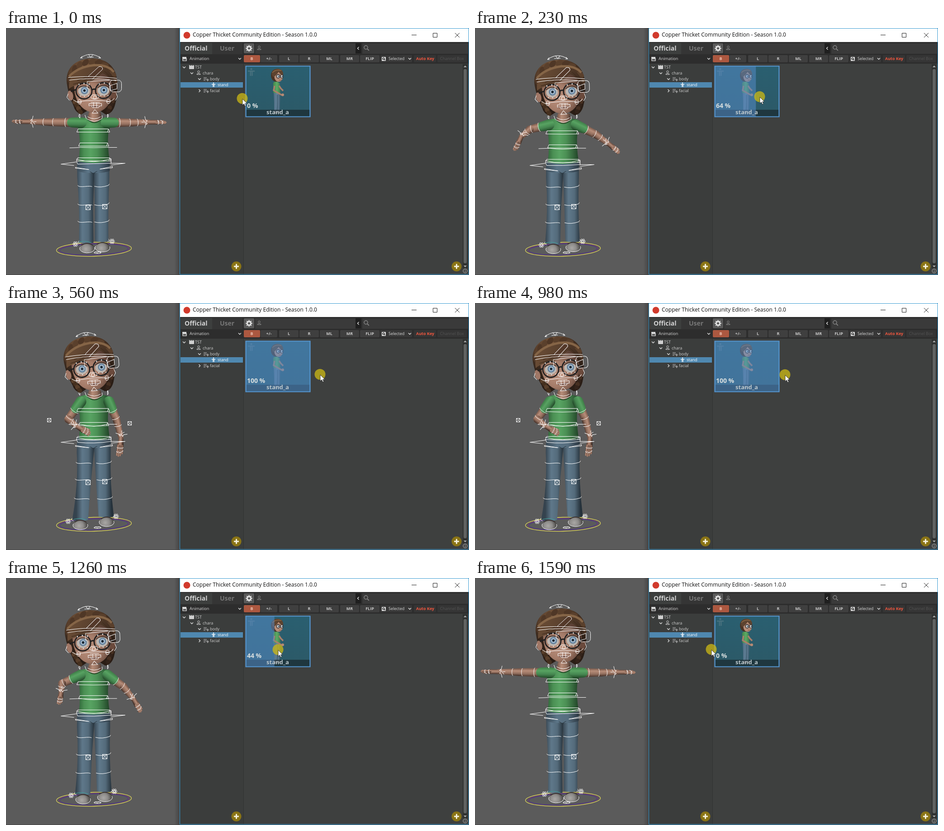
An HTML page with a canvas for the animation above (1.77 s loop, 1024 by 547 pixels).

```html
<!DOCTYPE html>
<html lang="en">
<head>
<meta charset="utf-8">
<title>Pose library</title>
<style>
html, body { margin: 0; width: 100%; height: 100%; overflow: hidden; background: #5b5b5b; }
canvas { display: block; width: 100vw; height: 100vh; }
</style>
</head>
<body>
<canvas id="stage" width="1024" height="547"></canvas>
<script>
const c = document.getElementById('stage').getContext('2d');
const LOOP = 1770;
const TICKS = [0, 50, 90, 140, 190, 230, 280, 320, 370, 410, 460, 510, 560, 980, 1020, 1070,
  1120, 1160, 1210, 1250, 1300, 1350, 1390, 1440, 1490, 1540, 1590];

// Keys are [position, value] pairs; values may be numbers or points.
const POINTER_X = [[0, 522], [50, 529], [230, 629], [410, 673], [560, 694], [979, 694], [980, 685],
  [1160, 628], [1390, 559], [1490, 539], [1540, 528], [1590, 522]];
const POINTER_Y = [[0, 156], [230, 152], [410, 155], [560, 158], [1160, 159], [1390, 158]];
const PERCENT = [[0, 0], [50, 0], [230, 64], [410, 82], [560, 100], [980, 100], [1160, 64], [1390, 14], [1490, 0]];
const POSE = [[0, 0], [40, 0], [230, .42], [410, .8], [560, 1], [980, 1], [1160, .84],
  [1390, .2], [1490, .04], [1540, .01], [1590, 0]];

const STOPS = [0, .2, .42, .81, 1];
const joint = (...pts) => pts.map((p, i) => [STOPS[i], p]);
const ARM_L = [
  joint([166, 209], [164, 212], [163, 214], [165, 216], [165, 218]),
  joint([98, 208], [112, 219], [121, 224], [127, 245], [137, 257]),
  joint([50, 207], [80, 227], [102, 240], [147, 269], [157, 273]),
  joint([12, 207], [48, 247], [87, 272], [157, 291], [187, 289])
];
const ARM_R = [
  joint([221, 209], [222, 211], [223, 214], [226, 216], [227, 218]),
  joint([278, 209], [272, 224], [268, 236], [250, 248], [244, 258]),
  joint([316, 208], [302, 233], [295, 256], [265, 285], [254, 299]),
  joint([355, 208], [339, 247], [320, 276], [272, 323], [250, 340])
];

const SKIN = ['#6d4f42', '#b78d79', '#94705f', '#3f2d26'];
const GREEN = ['#3c7a45', '#58a362', '#458650', '#224828'];
const JEANS = ['#35434e', '#5f788a', '#546b7b', '#25313a'];

const mix = (a, b, k) => a + (b - a) * k;
function track(keys, x) {
  let i = 0;
  while (i < keys.length - 1 && keys[i + 1][0] <= x) i++;
  const [x0, a] = keys[i], [x1, b] = keys[Math.min(i + 1, keys.length - 1)];
  const k = x1 > x0 ? Math.max(0, (x - x0) / (x1 - x0)) : 0;
  return Array.isArray(a) ? a.map((v, n) => mix(v, b[n], k)) : mix(a, b, k);
}

function rect(col, x, y, w, h, r = 0) {
  c.fillStyle = col;
  c.beginPath();
  c.roundRect(x, y, w, h, r);
  c.fill();
}
function fill(col, d) {
  c.fillStyle = col;
  c.fill(new Path2D(d));
}
function line(d, col = '#fff', w = 1) {
  c.strokeStyle = col;
  c.lineWidth = w;
  c.stroke(new Path2D(d));
}
function oval(col, x, y, rx, ry = rx, turn = 0) {
  c.fillStyle = col;
  c.beginPath();
  c.ellipse(x, y, rx, ry, turn, 0, 7);
  c.fill();
}
function ring(x, y, rx, ry = rx, col = '#fff', w = 1, turn = 0, from = 0, to = 2 * Math.PI) {
  c.strokeStyle = col;
  c.lineWidth = w;
  c.beginPath();
  c.ellipse(x, y, rx, ry, turn, from, to);
  c.stroke();
}
function text(s, x, y, size, col, bold, align = 'left') {
  c.font = `${bold ? 'bold ' : ''}${size}px "Open Sans", sans-serif`;
  c.textAlign = align;
  c.textBaseline = 'middle';
  c.fillStyle = col;
  c.fillText(s, x, y);
}
function blend(x0, y0, x1, y1, cols) {
  const g = c.createLinearGradient(x0, y0, x1, y1);
  cols.forEach((col, i) => g.addColorStop(i / (cols.length - 1), col));
  return g;
}
function glow(x, y, r, cols) {
  const g = c.createRadialGradient(x, y, 0, x, y, r);
  cols.forEach((col, i) => g.addColorStop(i / (cols.length - 1), col));
  return g;
}
const between = (a, b, k) => [mix(a[0], b[0], k), mix(a[1], b[1], k)];
const angle = (a, b) => Math.atan2(b[1] - a[1], b[0] - a[0]);

function limb(a, b, ra, rb, cols) {
  const t = angle(a, b), len = Math.hypot(b[0] - a[0], b[1] - a[1]);
  const lit = Math.cos(t) < .2 ? -1 : 1;
  c.save();
  c.translate(...a);
  c.rotate(t);
  c.fillStyle = blend(0, -ra * lit, 0, ra * lit, cols);
  c.beginPath();
  c.arc(0, 0, ra, Math.PI / 2, Math.PI * 1.5);
  c.lineTo(len, -rb);
  c.arc(len, 0, rb, -Math.PI / 2, Math.PI / 2);
  c.fill();
  c.restore();
}
function cuff(a, b, k, r) {
  ring(...between(a, b, k), 2.5, r, '#fff', 1, angle(a, b), -1.6, 1.6);
}
function crossBox(x, y, s) {
  line(`M${x - s} ${y - s}h${2 * s}v${2 * s}h${-2 * s}zl${2 * s} ${2 * s}M${x + s} ${y - s}l${-2 * s} ${2 * s}`);
}
function flower(x, y) {
  for (let i = 0; i < 6; i++) ring(x + 4 * Math.cos(i * 1.047), y + 4 * Math.sin(i * 1.047), 1.7);
  ring(x, y, 2);
}

function arm(joints, q) {
  const [s, e, w, tip] = joints.map(j => track(j, q));
  const turn = angle(w, tip), len = Math.hypot(tip[0] - w[0], tip[1] - w[1]);
  limb(s, e, 10.5, 8.5, SKIN);
  limb(e, w, 8.5, 5.5, SKIN);
  limb(w, between(w, tip, .45), 5, 5 + 2.5 * q, SKIN);
  for (let i = 0; i < 4; i++) {
    const off = (i - 1.5) * (1.7 + 1.9 * q), reach = len * (i === 0 ? .85 : 1 - .04 * Math.abs(i - 2));
    const at = (d, o) => [w[0] + d * Math.cos(turn) - o * Math.sin(turn), w[1] + d * Math.sin(turn) + o * Math.cos(turn)];
    const root = at(len * .42, off * .8), end = at(reach - 2, off);
    limb(root, end, 2.3 + .4 * q, 1.8 + .4 * q, SKIN);
    cuff(root, end, .15, 2.2);
    cuff(root, end, .6, 2);
  }
  limb(s, between(s, e, .3 + .08 * q), 12, 11, GREEN);
  cuff(s, e, .5, 10);
  cuff(s, e, .9, 8.5);
  cuff(e, w, .3, 8);
  // Wrist control
  c.save();
  c.translate(...between(w, tip, -.25));
  c.rotate(turn);
  line('M0 -13L2 -5L6 -3L2 0L6 3L2 5L0 13M-4 -6L4 6M-7 0H-2');
  c.restore();
}

function legs(q) {
  const m = (a, b) => mix(a, b, q);
  const shoe = (x, y) => {
    oval(glow(x - 3, y + 2, 19, ['#a9a7a5', '#8d8b89', '#454341']), x, y, 16.5, 10);
    ring(x, y + 1, 16.5, 9.5, '#fff', 1, 0, -.3, 3.5);
    line(`M${x - 13} ${y - 6}Q${x} ${y - 15} ${x + 13} ${y - 6}`, '#3c3330', 2);
  };
  const lx = m(161, 146), ly = m(474, 479), rx = m(226, 238), ry = m(471, 472);
  fill(blend(155, 0, 195, 0, JEANS),
    `M157 298L${m(157, 156)} 330Q${m(163, 160)} 400 ${lx} ${ly}Q${lx + 16} ${ly + 6} ${m(193, 181)} ${ly + 1}L${m(192, 187)} 400L195 318V298z`);
  fill(blend(193, 0, 233, 0, JEANS),
    `M194 298V320L${m(196, 199)} 400L${m(196, 204)} ${ry}Q${m(210, 221)} ${ry + 5} ${rx} ${ry}Q${m(225, 229)} 400 ${m(228, 231)} 330V298z`);
  fill(blend(156, 0, 230, 0, ['#3a4a56', '#5b7486', '#566d7e', '#2a3640']), 'M157 296H229L229 316Q211 322 195 320Q174 322 157 316z');
  line('M194 324Q194 319 201 317M193 324Q190 319 185 318', '#2c3942', 1.2);
  line(`M${m(159, 148)} ${ly}q15 -5 29 1`, '#3fa39a');
  shoe(m(179, 164), m(487, 491));
  shoe(m(213, 222), m(485, 484));
  // Leg rings
  [[350, 354], [391, 391], [429, 433]].forEach(([a, b], i) => {
    const y = m(a, b);
    line(`M${m(158, 154 - i * 2)} ${y - 2}q2 4 16 2.5t${m(16, 18)} .5`);
    line(`M${m(195, 199 + i)} ${y}q14 4 ${m(31, 32)} -2l2 -3`);
  });
  line(`M${lx} ${ly - 3}q-5 4 3 6M${rx} ${ry - 4}q5 4 -2 5`);
  crossBox(181, 397, 5);
  crossBox(218, 395, 5);
  flower(m(153, 137), m(478, 483));
  flower(m(234, 243), m(472, 472));
  ring(202, 497, 8, 2);
  line('M195 497l3 -2l3 3l4 -3l4 2');
}

function torso(q) {
  const m = (a, b) => mix(a, b, q);
  const y = m(0, 5), neck = m(186, 193), in_ = 7 * q;
  fill(blend(180, 0, 212, 0, SKIN), `M183 ${neck}H209L213 ${206 + y}Q195 ${220 + y} 178 ${206 + y}z`);
  fill(blend(158, 0, 229, 0, ['#2c5f35', '#4b9054', '#58a362', '#4c9155', '#376b3f', '#204226']),
    `M177 ${198 + y}Q166 ${199 + y} ${154 + in_} ${203 + y}L161 ${230 + y}Q165 262 ${m(160, 161)} ${295 + y}Q194 ${302 + y} 229 ${295 + y}Q223 260 226 ${230 + y}L${235 - in_} ${203 + y}Q224 ${199 + y} 213 ${198 + y}Q196 ${219 + y} 177 ${198 + y}z`);
  line(`M177 ${199 + y}Q195 ${219 + y} 213 ${199 + y}`, '#28552f', 2);
}

function torsoControls(q) {
  const m = (a, b) => mix(a, b, q);
  const y = m(0, 5), band = (x0, x1, top, h) =>
    line(`M${x0 + 3} ${top}H${x1 - 3}L${x1} ${top + h}Q${(x0 + x1) / 2} ${top + h + 2 * q} ${x0} ${top + h}zM${x1 - 3} ${top}l-2 ${h}`);
  band(156, 229, m(223, 233), 7);
  band(160, 227, m(254, 264), 7);
  band(155, 232, m(287, 295), 7);
  const mid = m(265, 269), hip = m(300, 307);
  line(`M140 ${mid}L165 ${mid - 1}Q194 ${mid + 8 * q} 222 ${mid - 1}L245 ${mid - 1}`);
  line(`M121 ${hip + 1}L156 ${hip - 4}L158 ${hip + 1}Q194 ${hip + 5 * q} 231 ${hip - 1}L263 ${hip - 1}L232 ${hip + 3}M121 ${hip + 1}L150 ${hip + 4}`);
  line(`M155 ${hip - 10}Q194 ${hip + 1} 232 ${hip - 11}V${hip}`);
  line(`M153 ${hip + 8}L183 ${hip + 13}L153 ${hip + 10}zM207 ${hip + 12}L235 ${hip + 6}V${hip + 9}z`);
  line(`M174 ${192 + y}l3 8Q194 ${212 + y} 212 ${200 + y}V${193 + y}M180 ${196 + y}Q195 ${205 + y} 209 ${196 + y}`);
  line(`M160 ${195 + y}l3 -8v12zM226 ${195 + y}l-2 -9v12z`);
}

function head(q) {
  c.save();
  c.translate(194 - 5 * q, 140 + 6 * q);
  c.rotate(-.07 * q);
  c.translate(-194, -140);
  const brown = glow(176, 84, 95, ['#7b5a3f', '#5b412d', '#33241a', '#2a1d15']);
  fill(brown, 'M134 122C130 86 156 67 190 67C226 67 247 90 245 124Q247 150 240 172Q234 190 220 191L194 174L166 191Q152 186 149 172Q138 150 134 122z');
  for (let i = 0; i < 11; i++) {
    const a = Math.PI * (1.02 + i * .096);
    oval(i % 2 ? '#5a402c' : '#4f3726', 190 + 49 * Math.cos(a), 117 + 43 * Math.sin(a), 9, 6, a + 1.1);
  }
  for (let i = 0; i < 4; i++) {
    oval(i % 2 ? '#45301f' : '#593f2b', 152 + i * 4, 164 + i * 7, 6, 5, .8);
    oval(i % 2 ? '#33231a' : '#452f21', 235 - i * 3, 162 + i * 7, 5, 5, -.8);
  }
  oval('#a07766', 142, 149, 6, 11, -.2);
  oval('#6b4a3c', 239, 149, 5, 11, .2);
  fill(glow(183, 150, 56, ['#ba907d', '#a57c69', '#5b4035']),
    'M150 128Q155 96 194 96Q233 98 236 134Q236 163 217 179Q195 195 172 179Q151 163 150 128z');
  // Bangs and headband
  fill(blend(140, 80, 240, 125, ['#6e4f37', '#5a412e', '#3a281d']),
    'M139 134Q135 93 189 82Q237 82 243 134Q235 114 214 98Q192 121 168 124Q150 125 139 134z');
  line('M139 107Q158 86 193 82Q224 80 238 97', '#856547', 5);
  line('M148 124Q180 118 205 94M157 116Q184 108 203 89M217 95Q231 106 238 124', '#3f2b1e', 1.2);
  fill('#54392a', 'M176 111L203 85Q214 84 215 92L187 117z');
  line('M181 107L205 85Q214 84 213 91L190 113');

  // Eyes
  [[172, 138], [215, 137]].forEach(([x, y]) => {
    oval('#bdb8b3', x, y + 1, 13, 11);
    oval(glow(x + 1, y, 8.5, ['#8fabc4', '#86a4c0', '#4d6b86']), x + 1, y, 8);
    oval('#1c2833', x + 1, y, 2.8);
    ring(x + 1, y, 4, 4, '#e4e8ea', .8);
    line(`M${x - 13} ${y - 5}Q${x} ${y - 15} ${x + 13} ${y - 5}`, '#41302a', 1.8);
    ring(x, y + 1, 17.5, 17.5, '#222020', 2.8);
  });
  line('M189 137Q194 133 198 136M154 136L143 140M233 135L242 139', '#222020', 3);
  oval('#c0957f', 195, 152, 6, 5);
  line('M184 172Q195 176 207 171', '#5f3a32', 2);

  // Rig controls
  line('M164 66Q186 50 209 66M164 66l4 -4M164 66h5M209 66l-4 -4M209 66h-5M182 58l5 7l5 -7M179 64h14');
  line('M137 109Q190 104 245 111M139 115Q190 108 243 116');
  line('M179 118L229 115M179 118V134');
  c.beginPath();
  c.roundRect(229, 115, 26, 26, 7);
  c.stroke();
  line('M230 127L245 122V134L231 138z');
  line('M157 163Q194 157 229 162M148 158Q157 166 166 164M222 163Q234 163 239 155');
  ring(162, 163, 4, 5);
  ring(226, 162, 4, 5);
  ring(196, 152, 9, 5);
  ring(196, 153, 3.5);
  line('M183 167H211V172H183zM187 164H207M188 172l3 4h13l3 -4M193 165v10M200 165v10');
  line('M196 180l-6 8h13zM137 145l-3 8l6 7M243 143l3 9l-5 8');
  for (let i = 0; i < 3; i++) {
    rect('#eee', 160 + i * 11, 123 - 2 * (i % 2), 2, 3);
    rect('#eee', 205 + i * 11, 122 - 2 * (i % 2), 2, 3);
    rect('#eee', 163 + i * 9, 149 + i % 2, 2, 2);
    rect('#eee', 208 + i * 8, 148 + i % 2, 2, 2);
  }
  c.restore();
}

function character(q) {
  c.save();
  c.translate(.5, .5);
  ring(194, 489.5, 83, 15.5, '#e0d65a', 1.3, -.03);
  ring(194, 489.5, 77, 12.5, '#742f75', 1.4, -.03);
  ring(194, 490, 75, 12, '#29419a', .7, -.03);
  legs(q);
  torso(q);
  arm(ARM_L, q);
  arm(ARM_R, q);
  torsoControls(q);
  head(q);
  if (q > .6) {
    crossBox(mix(105, 95, q), mix(214, 259, q), 4);
    crossBox(mix(263, 273, q), mix(212, 266, q), 4);
  }
  c.restore();
}

function person(x, y, col) {
  ring(x, y - 2, 2.3, 2.3, col);
  line(`M${x - 4} ${y + 4}V${y + 3}Q${x} ${y} ${x + 4} ${y + 3}V${y + 4}z`, col);
}
function tPose(x, y, s, col) {
  oval(col, x, y - 4 * s, 1.5 * s);
  line(`M${x - 5 * s} ${y - s}H${x + 5 * s}M${x - 1.2 * s} ${y - s}V${y + 6 * s}M${x + 1.2 * s} ${y - s}V${y + 6 * s}`, col, 1.6 * s);
}
function chevron(x, y, turn = 0) {
  c.save();
  c.translate(x, y);
  c.rotate(turn);
  line('M-3 -1.5L0 1.5L3 -1.5', '#e0e0e0', 1.4);
  c.restore();
}
function lens(x, y, r, col) {
  ring(x, y, r, r, col, 1.5);
  line(`M${x + r * .7} ${y + r * .7}l${r} ${r}`, col, 1.8);
}
function plus(x) {
  oval('#8a7415', x + .5, 528, 11);
  line(`M${x - 5} 528h11M${x + .5} 522.5v11`, '#f4f0dc', 3);
}
function listIcon(y) {
  line(`M437 ${y - 3}h7M437 ${y}h7M437 ${y + 3}h4M443 ${y + 2}h6M446 ${y - 1}v6`, '#c4c4c4', 1.2);
}

function panel() {
  rect('#3e403f', 384, 0, 640, 546);
  rect('#fff', 385, 1, 638, 30);
  oval('#d13a2c', 400, 16, 7.5);
  text('Copper Thicket Community Edition - Season 1.0.0', 413, 16, 12, '#111');
  line('M897 15.5h11M944.5 11.5h9v9h-9zM993 11l10 10M1003 11l-10 10', '#222');

  // Tabs and search row
  rect('#2d2d2d', 385, 31, 638, 48);
  rect('#3d3f3e', 386, 33, 70, 25);
  rect('#353535', 456, 33, 67, 25);
  text('Official', 395, 46, 14, '#d2d2d2', true);
  text('User', 473, 46, 14, '#777', true);
  rect('#5a5a5a', 526, 34, 23, 22, 2);
  ring(537.5, 45, 4, 4, '#e5e5e5', 2.8);
  for (let i = 0; i < 8; i++) {
    const a = i * Math.PI / 4;
    oval('#e5e5e5', 537.5 + 6 * Math.cos(a), 45 + 6 * Math.sin(a), 1.3);
  }
  rect('#3a3a3a', 551, 34, 222, 23);
  person(560, 44, '#888');
  rect('#1f1f1f', 773, 34, 12, 22);
  chevron(779, 45, Math.PI / 2);
  rect('#3a3a3a', 788, 34, 234, 23);
  lens(796, 43, 4, '#888');

  // Tool row
  rect('#dcdcdc', 390, 64, 9, 3);
  line('M391 68.5h8v4h-8zM390 68h10', '#dcdcdc', 1.4);
  text('Animation', 406, 68.5, 9, '#d8d8d8');
  chevron(517, 68);
  rect('#ac5840', 526, 60, 36, 16, 2);
  text('B', 543.5, 68.5, 9, '#eec2b2', true, 'center');
  [['+/-', 563, 37], ['L', 604, 43], ['R', 649, 43], ['ML', 694, 42], ['MR', 739, 42], ['FLIP', 783, 43]].forEach(([s, x, w]) => {
    rect('#3f3f3f', x, 60, w, 16, 2);
    text(s, x + w / 2, 68.5, 9, '#c8c8c8', true, 'center');
  });
  rect('#383838', 828, 60, 70, 16, 2);
  rect('#e2e2e2', 831, 64, 9, 9, 1);
  lens(835, 68, 2, '#333');
  text('Selected', 846, 68.5, 9, '#d8d8d8');
  chevron(893, 68);
  rect('#353535', 902, 60, 49, 16, 2);
  text('Auto Key', 907, 68.5, 9, '#f2573f', true);
  rect('#353535', 954, 60, 65, 16, 2);
  text('Channel Box', 960, 68.5, 9, '#535353');

  // Tree
  rect('#3b3d3c', 386, 79, 139, 466);
  rect('#303231', 525, 79, 1, 466);
  rect('#4f88b0', 386, 120, 138, 12);
  chevron(394, 87);
  rect('#d0d0d0', 405, 84, 11, 7, 1);
  line('M405 82.5l3 2M409 82.5l3 2M413 82.5l3 2', '#d0d0d0', 1.6);
  text('TST', 418, 87.5, 9, '#d0d0d0');
  chevron(411, 100);
  person(426, 99, '#d0d0d0');
  text('chara', 435, 100.5, 9, '#d0d0d0');
  chevron(428, 113);
  listIcon(113);
  text('body', 451, 113.5, 9, '#d0d0d0');
  tPose(459, 125.5, .85, '#fff');
  text('stand', 468, 126.5, 9, '#fff');
  chevron(428, 139, -Math.PI / 2);
  listIcon(139);
  text('facial', 451, 140, 9, '#d0d0d0');

  // Scroll bar and buttons
  rect('#303231', 1010, 80, 11, 452);
  rect('#606261', 1012, 91, 7, 430, 3);
  fill('#aaa', 'M1012 87h7l-3.5 -4zM1012 526h7l-3.5 4z');
  ring(1015.5, 538, 4.5, 4.5, '#bbb');
  line('M1015.5 537v3.5M1015.5 535v1', '#bbb');
  plus(509);
  plus(996);
  line('M384.5 .5H1023.5V545.5H384.5z', '#2f95cf');
}

function miniFigure() {
  fill(blend(591, 0, 608, 0, ['#4d6a80', '#63839a', '#3d586c']),
    'M592 142H607L606 165L605 186H599L600 164L598 187H593L593 165z');
  line('M600 148V184', '#2f4759');
  oval('#a8aaa8', 597, 187, 5, 2.5);
  oval('#92989a', 605, 186, 4, 2.5);
  fill(blend(590, 0, 608, 0, ['#3f8148', '#5dab65', '#3d7645']), 'M591 121Q598 116 605 122L607 143Q599 146 591 143z');
  line('M594 128L592 138L602 144L611 149M604 128L608 134L613 139', '#a97f6b', 3.5);
  oval('#b58a75', 612, 148, 3);
  oval('#4a3324', 598, 105, 12, 14);
  oval('#b88d77', 603, 108, 9.5, 11);
  fill('#5d432f', 'M588 104Q588 90 601 90Q614 91 613 105Q606 103 603 97Q599 104 591 109z');
  line('M589 99Q596 91 609 94', '#8f6d49', 1.6);
  oval('#c9c7c3', 602, 107, 3);
  oval('#c9c7c3', 610, 107, 2.5, 3);
  ring(602, 107, 4, 4, '#22252a', 1.3);
  ring(610, 107, 3.2, 4, '#22252a', 1.2);
  oval('#345672', 603, 107, 1.5);
  oval('#345672', 611, 107, 1.3);
  line('M603 115q4 2 7 0', '#74463b');
}

function card(pct) {
  rect(blend(0, 84, 0, 196, ['#2a5f70', '#2c5967']), 530, 84, 143, 113);
  tPose(542.5, 97, 1.5, '#49717f');
  miniFigure();
  rect('rgba(24,34,40,.62)', 531, 181, 141, 15);
  rect('rgba(86,140,202,.52)', 531, 85, 141 * pct / 100, 111);
  line('M530.5 84.5H672.5V196.5H530.5z', '#5596d0', 2.2);
  text(`${Math.round(pct)} %`, 533, 173, 14, '#d9dfdf', true);
  text('stand_a', 601, 188, 13, '#b9c5ca', true, 'center');
}

function pointer(x, y) {
  oval('rgba(205,185,20,.75)', x + .5, y, 12);
  c.save();
  c.translate(x + 1, y + 1);
  const d = 'M0 0V14L3.3 11L5.6 16L7.9 15L5.7 10.2H10z';
  fill('#fff', d);
  line(d, '#222', .8);
  c.restore();
}

function draw(now) {
  const time = now % LOOP;
  const t = TICKS.filter(v => v <= time).pop();
  rect('#5b5b5b', 0, 0, 1024, 547);
  rect(blend(372, 0, 384, 0, ['#5b5b5b', '#454545']), 372, 0, 12, 547);
  rect('#464646', 0, 546, 1024, 1);
  character(track(POSE, t));
  panel();
  card(track(PERCENT, t));
  pointer(track(POINTER_X, t), track(POINTER_Y, t));
}

const start = performance.now();
function loop() {
  draw(performance.now() - start);
  requestAnimationFrame(loop);
}
loop();
</script>
</body>
</html>
```
